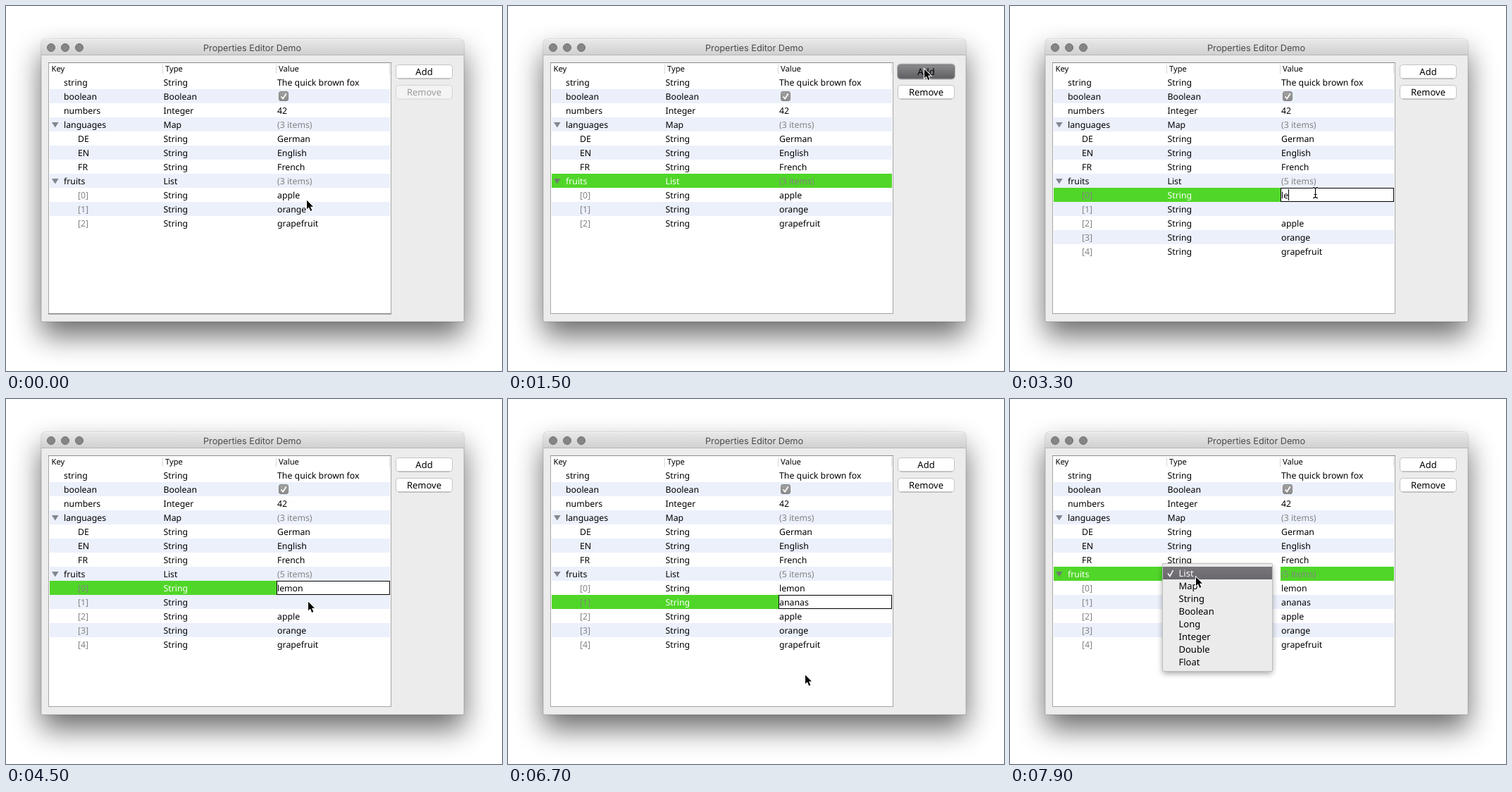
An HTML page that plays this animation: 704x518 px, repeating every 8000 ms.

```html
<!DOCTYPE html>
<html lang="en">
<head>
<meta charset="utf-8">
<title>Properties Editor Demo</title>
<style>
  html, body { margin: 0; width: 100%; height: 100%; overflow: hidden; background: #fff; }
  svg { display: block; width: 704px; height: 518px; }
  text { font-family: "Noto Sans", "Open Sans", sans-serif; font-size: 12.3px; text-rendering: geometricPrecision; white-space: pre; }
  .title { font-family: Inter, Roboto, sans-serif; font-size: 12.7px; fill: #4a4a4a; text-anchor: middle; }
  .head { font-size: 11.2px; }
  .btn { font-size: 13px; text-anchor: middle; }
  .item { font-size: 13px; }
</style>
</head>
<body>
<svg viewBox="0 0 704 518" xmlns="http://www.w3.org/2000/svg">
  <defs>
    <filter id="soft" x="-30%" y="-30%" width="160%" height="160%"><feGaussianBlur stdDeviation="20"/></filter>
    <filter id="near" x="-20%" y="-20%" width="140%" height="140%"><feGaussianBlur stdDeviation="4"/></filter>
    <linearGradient id="bar" x2="0" y2="1"><stop stop-color="#e9e8e9"/><stop offset="1" stop-color="#d1d0d1"/></linearGradient>
    <linearGradient id="down" x2="0" y2="1"><stop stop-color="#8b8b8e"/><stop offset="1" stop-color="#5e5e62"/></linearGradient>
    <linearGradient id="hot" x2="0" y2="1"><stop stop-color="#78757b"/><stop offset="1" stop-color="#6a676d"/></linearGradient>
    <linearGradient id="box" x2="0" y2="1"><stop stop-color="#a2a2a2"/><stop offset="1" stop-color="#8a8a8a"/></linearGradient>
  </defs>

  <rect x="50" y="67" width="600" height="401" filter="url(#soft)" opacity=".58"/>
  <path d="M50 448V52a5 5 0 0 1 5-5H645a5 5 0 0 1 5 5V448Z" fill="#ececec" stroke="#000" stroke-opacity=".18"/>
  <path d="M50 70V52a5 5 0 0 1 5-5H645a5 5 0 0 1 5 5V70Z" fill="url(#bar)"/>
  <path d="M54 47.5H646" stroke="#f5f5f5"/>
  <path d="M50 69.5H650" stroke="#b6b5b6"/>
  <g fill="#858585" stroke="#6f6f6f">
    <circle cx="64" cy="59" r="5.5"/><circle cx="84" cy="59" r="5.5"/><circle cx="104" cy="59" r="5.5"/>
  </g>
  <text class="title" x="349.5" y="63.7">Properties Editor Demo</text>

  <rect x="60.5" y="80.5" width="486" height="356" fill="#fff" stroke="#a6a6a6"/>
  <path d="M60 80.5H547" stroke="#8c8c8c"/>
  <path d="M222.5 83V96M383.5 83V96M544.5 83V96" stroke="#d8d8d8"/>
  <text class="head" x="64.5" y="93">Key</text>
  <text class="head" x="226" y="93">Type</text>
  <text class="head" x="387" y="93">Value</text>
  <g id="live"></g>
</svg>
<script>
const LOOP = 8000, STEP = 100;
const live = document.getElementById('live');

// Each list holds [start time, value]
const SELECTED = [[0, -1], [500, 7], [2300, 8], [4700, 9], [6900, -1], [7700, 7]];
const EDITING = [[0, -1], [2600, 8], [4700, -1], [4800, 9], [6900, -1]];
const ADDED = [[0, 0], [1600, 1], [1800, 2]];
const PRESSED = [[0, 0], [1400, 1], [1600, 0], [1700, 1], [1800, 0]];
const ADD_FOCUS = [[0, 0], [1400, 1], [2300, 0]];
const TABLE_FOCUS = [[0, 1], [1400, 0], [2300, 1], [2600, 0], [4700, 1], [4800, 0], [6900, 1], [7800, 0]];
const BEAM = [[0, 0], [2600, 1], [4400, 0], [4800, 1], [6400, 0]];
const TYPED = [[2600, ''], [3300, 'le'], [3400, 'lem'], [3600, 'lemo'], [3800, 'lemon'],
  [4800, ''], [5300, 'a'], [5400, 'an'], [5500, 'ana'], [5600, 'anan'], [5900, 'anana'], [6200, 'ananas']];
const MENU_AT = 7800;
const MENU = ['List', 'Map', 'String', 'Boolean', 'Long', 'Integer', 'Double', 'Float'];

const smooth = u => (1 - Math.cos(Math.PI * u)) / 2;
const linear = u => u;
const out = u => 1 - (1 - u) * (1 - u);
// Pointer path: time, x, y, easing used to get there
const PATH = [
  [0, 426, 274], [300, 399, 246, out], [500, 399, 246], [1000, 574, 49, smooth],
  [1300, 590, 88, smooth], [1700, 590, 88], [1800, 582, 94, linear], [1900, 528, 136, linear],
  [2200, 433, 265, out], [4100, 433, 265], [4500, 428, 286, smooth], [6200, 429, 286],
  [6400, 423, 312, linear], [6700, 421, 390, out], [6900, 421, 390], [7400, 263, 251, smooth]
];

const entry = (list, t) => list.filter(e => e[0] <= t).pop();
const at = (list, t) => entry(list, t)[1];

function pointer(t) {
  const i = PATH.findIndex(k => k[0] > t);
  if (i < 0) return PATH[PATH.length - 1].slice(1, 3);
  const [t0, x0, y0] = PATH[i - 1], [t1, x1, y1, ease = linear] = PATH[i];
  const u = ease((t - t0) / (t1 - t0));
  return [Math.round(x0 + (x1 - x0) * u), Math.round(y0 + (y1 - y0) * u)];
}

const rect = (x, y, w, h, fill, more = '') =>
  `<rect x="${x}" y="${y}" width="${w}" height="${h}" fill="${fill}" ${more}/>`;
const text = (x, y, s, fill = '#000', cls = '') =>
  `<text x="${x}" y="${y}" fill="${fill}" class="${cls}">${s}</text>`;
const path = (d, more) => `<path d="${d}" ${more}/>`;

function rows(t) {
  const fruits = ['apple', 'orange', 'grapefruit'];
  const added = at(ADDED, t);
  if (added) fruits.unshift(...[t >= 4700 ? 'lemon' : '', t >= 6900 ? 'ananas' : ''].slice(0, added));
  return [
    ['string', 'String', 'The quick brown fox'],
    ['boolean', 'Boolean', true],
    ['numbers', 'Integer', '42'],
    ['languages', 'Map', '(3 items)'],
    ['DE', 'String', 'German', 1],
    ['EN', 'String', 'English', 1],
    ['FR', 'String', 'French', 1],
    ['fruits', 'List', `(${fruits.length} items)`],
    ...fruits.map((f, i) => [`[${i}]`, 'String', f, 1])
  ];
}

function checkbox(y) {
  return rect(387.5, y + 3.5, 13, 13, 'url(#box)', 'rx="2.5" stroke="#858585"') +
    path(`M390.5 ${y + 10.5}l2.6 3 4.6-7`, 'fill="none" stroke="#fff" stroke-width="1.7"');
}

function row([key, type, value, child], i, sel) {
  const y = 98 + i * 20, base = y + 15, on = i === sel;
  const ink = on ? '#fff' : '#000', grey = '#838383';
  const group = value !== true && value[0] === '(';
  let s = '';
  if (on || i % 2) s += rect(62, y, 483, 20, on ? '#50d628' : '#ebf0fb');
  if (group) s += path(`M65 ${y + 7}h9.6l-4.8 7.6z`, `fill="${on ? '#6f7f6c' : '#83868c'}"`);
  s += text(child ? 102 : 82, base, key, key[0] === '[' ? grey : ink);
  s += text(223.5, base, type, ink);
  return s + (value === true ? checkbox(y) : text(385, base, value, group ? grey : ink));
}

function editor(t, i) {
  const y = 98 + i * 20, [since, word] = entry(TYPED, t);
  let s = rect(384.5, y + .5, 160, 19, '#fff', 'stroke="#000"') +
    `<text id="word" x="385" y="${y + 15}">${word}</text>`;
  if ((t - since) % 1000 < 500) s += rect(385, y + 2, 1, 16, '#000', 'id="caret"');
  return s;
}

function button(y, label, enabled, focus, pressed) {
  let s = '';
  if (focus) s += rect(552, y - 1.5, 83, 23, '#b3b3b3', 'rx="5.5"');
  s += rect(553.5, y + .5, 80, 19.5, pressed ? 'url(#down)' : enabled ? '#fff' : '#f4f4f4',
    `rx="4" stroke="${pressed ? '#77777a' : enabled ? '#c4c4c4' : '#d3d3d3'}"`);
  if (enabled && !pressed) s += path(`M557 ${y + 20}h73`, 'stroke="#a9a9a9"');
  return s + text(593.5, y + 15, label, enabled ? '#000' : '#9c9c9c', 'btn');
}

function menu() {
  return rect(222, 238, 162, 20, '#fff') +
    rect(217, 238, 155, 151, '#000', 'filter="url(#near)" opacity=".4"') +
    rect(216.5, 233.5, 156, 153, '#ebebeb', 'rx="1.5" stroke="#bdbdbd"') +
    rect(217, 238, 155, 18, 'url(#hot)') +
    path('M224 247.5l3 4 4.5-8.5', 'fill="none" stroke="#fff" stroke-width="1.6"') +
    MENU.map((m, i) => text(239.5, 252 + i * 18, m, i ? '#000' : '#fff', 'item')).join('');
}

function cursor(t) {
  const [x, y] = pointer(t);
  const beam = 'M-3.5-7.5q3 0 3.5 2q.5-2 3.5-2M0-5.5V5.5M-3.5 7.5q3 0 3.5-2q.5 2 3.5 2M-2 2.5H2';
  const arrow = 'M1 1.8V14.2L3.9 11.6 6.2 17 8.3 16.1 6 10.8H10Z';
  const shape = at(BEAM, t)
    ? path(beam, 'fill="none" stroke="#fff" stroke-width="2.4" opacity=".7"') +
      path(beam, 'fill="none" stroke="#000" stroke-width="1.1"')
    : path(arrow, 'fill="#000" stroke="#fff" stroke-width="2" paint-order="stroke"');
  return `<g transform="translate(${at(BEAM, t) ? x + .5 : x} ${y})">${shape}</g>`;
}

function draw(t) {
  const sel = at(SELECTED, t), edit = at(EDITING, t);
  let s = rows(t).map((r, i) => row(r, i, sel)).join('');
  if (at(TABLE_FOCUS, t)) s += path('M60 437.5H547', 'stroke="#a9a9a9"') + path('M60 436.5H547', 'stroke="#8f8f8f"');
  if (edit >= 0) s += editor(t, edit);
  s += button(83, 'Add', true, at(ADD_FOCUS, t), at(PRESSED, t));
  s += button(112, 'Remove', sel >= 0);
  if (t >= MENU_AT) s += menu();
  live.innerHTML = s + cursor(t);
  const caret = document.getElementById('caret');
  if (caret) {
    const width = document.getElementById('word').getComputedTextLength();
    caret.setAttribute('x', 385 + Math.round(width));
  }
}

let shown = -1;
function tick() {
  const t = Math.floor(performance.now() % LOOP / STEP) * STEP;
  if (t !== shown) draw(shown = t);
  requestAnimationFrame(tick);
}
tick();
</script>
</body>
</html>
```
